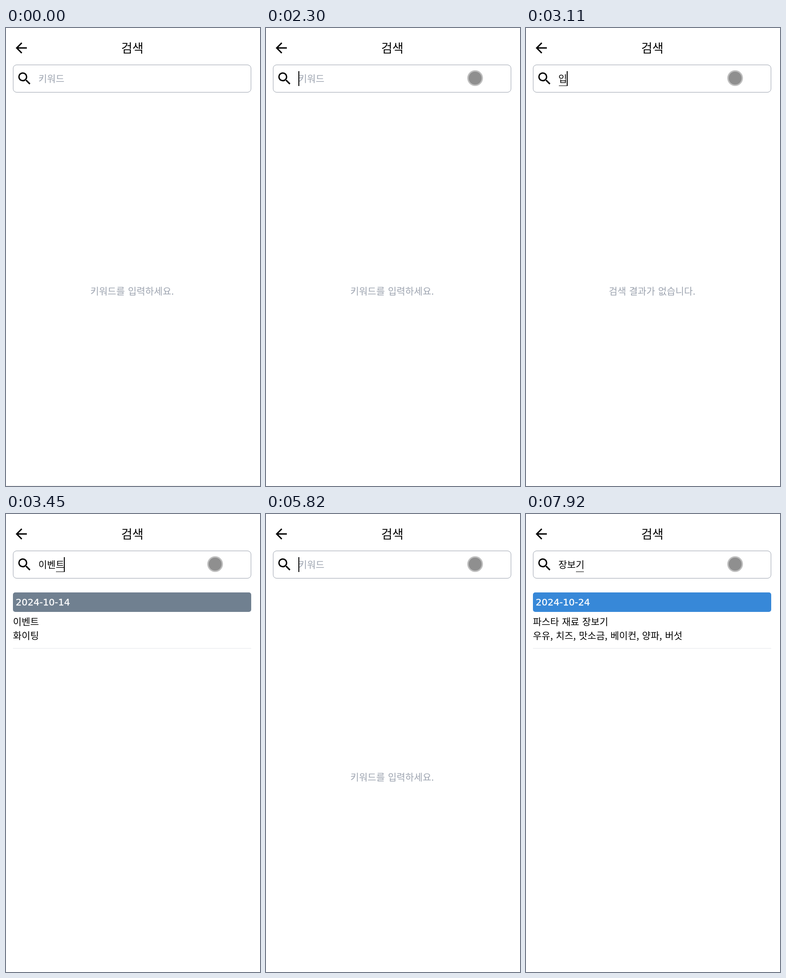
Animation of 549x987 px, one loop 8 s. Source, as an HTML page:

```html
<!DOCTYPE html>
<html lang="ko">
<head>
<meta charset="utf-8">
<title>검색</title>
<style>
  html, body { margin: 0; width: 100%; height: 100%; overflow: hidden; background: #fff; }
  svg { display: block; width: 100vw; height: 100vh; }
  text { font: 20.35px "Noto Sans CJK KR", "Noto Sans CJK", "Noto Sans KR", sans-serif; word-spacing: .8px; white-space: pre; }
  .title { font-size: 26.2px; }
  .mid { text-anchor: middle; }
  .hint { fill: #9ca3af; }
  .date { font: 20.2px "DejaVu Sans", sans-serif; fill: #fff; stroke: #fff; stroke-width: .35px; }
</style>
</head>
<body>
<svg viewBox="0 0 549 987" preserveAspectRatio="none">
  <path transform="translate(15 25) scale(1.5)" d="M20 11H7.83l5.59-5.59L12 4l-8 8 8 8 1.41-1.41L7.83 13H20v-2z"/>
  <text class="title mid" x="273" y="53">검색</text>
  <rect x="15.5" y="79.5" width="514" height="59" rx="7.5" fill="none" stroke="#9ca3af"/>
  <path transform="translate(22 91) scale(1.5)" d="M15.5 14h-.79l-.28-.27A6.47 6.47 0 0 0 16 9.5 6.5 6.5 0 1 0 9.5 16c1.61 0 3.09-.59 4.23-1.57l.27.28v.79l5 4.99L20.49 19l-4.99-5zm-6 0C7.01 14 5 11.99 5 9.5S7.01 5 9.5 5 14 7.01 14 9.5 11.99 14 9.5 14z"/>
  <text id="query" x="70" y="116.5"></text>
  <rect id="underline" y="124" width="17" height="1"/>
  <rect id="caret" y="93" width="2" height="32"/>
  <text id="message" class="mid hint" x="272.5" y="574.5"></text>
  <g id="list"></g>
  <rect id="footer" y="986" width="549" height="1" fill="#ebebeb"/>
  <g id="pointer">
    <circle r="17" fill-opacity=".25"/>
    <circle r="14" fill-opacity=".25"/>
  </g>
</svg>
<script>
const LOOP = 8000, FOCUS = 1300, CHAR = 18.72;

const events = [
  { date: '2024-10-14', color: '#708090', title: '이벤트', note: '화이팅' },
  { date: '2024-10-24', color: '#3788d8', title: '파스타 재료 장보기', note: '우유, 치즈, 맛소금, 베이컨, 양파, 버섯' }
];

// [time, query, caret visible, last character still being composed]
const steps = [
  [0, '', 0, 0], [FOCUS, '', 1, 0], [1810, '', 0, 0], [2300, '', 1, 0],
  [2790, 'ㅇ', 1, 1], [2890, '이', 1, 1], [3030, '입', 1, 1], [3120, '이베', 1, 1],
  [3220, '이벤', 1, 1], [3310, '이벤ㅌ', 1, 1], [3450, '이벤트', 1, 1],
  [3940, '이벤트', 0, 1], [4430, '이벤트', 1, 1], [4920, '이벤트', 0, 1],
  [5300, '이벤ㅌ', 1, 1], [5460, '이벤', 1, 0], [5620, '이', 1, 0], [5820, '', 1, 0],
  [5970, '', 0, 0], [6450, '', 1, 0],
  [6820, 'ㅈ', 1, 1], [6960, '자', 1, 1], [7030, '장', 1, 1], [7140, '장ㅂ', 1, 1],
  [7230, '장보', 1, 1], [7310, '장복', 1, 1], [7400, '장보기', 1, 1], [7920, '장보기', 0, 1]
];

const $ = id => document.getElementById(id);
const show = (el, on) => el.setAttribute('visibility', on ? 'visible' : 'hidden');

const card = (e, i) => `<g transform="translate(15 ${169 + 133 * i})">
  <rect width="515" height="42" rx="5" fill="${e.color}"/>
  <text class="date" x="6" y="28.3">${e.date}</text>
  <text y="70.5">${e.title}</text>
  <text y="100.5">${e.note}</text>
  <rect y="120" width="515" height="1" fill="#e5e7eb"/>
</g>`;

function drawStep([, text, caretOn, composing]) {
  const n = text.length;
  $('query').textContent = text || '키워드';
  $('query').setAttribute('class', text ? '' : 'hint');
  $('caret').setAttribute('x', 70 + Math.floor(18.5 * n));
  show($('caret'), caretOn);
  $('underline').setAttribute('x', Math.round(70.8 + CHAR * (n - 1)));
  show($('underline'), composing);

  const found = text ? events.filter(e => (e.title + '\n' + e.note).includes(text)) : [];
  $('list').innerHTML = found.map(card).join('');
  $('message').textContent = found.length ? '' : text ? '검색 결과가 없습니다.' : '키워드를 입력하세요.';
}

function drawPointer(t) {
  const p = Math.min(1, Math.max(0, (t - 720) / 370));
  const k = 1 - (1 - p) ** 2;
  const scale = t >= FOCUS && t < 1380 ? 1.04 : 1;
  $('pointer').setAttribute('transform', `translate(${519 - 67 * k} ${70 + 38 * k}) scale(${scale})`);
  show($('pointer'), t >= 720);
}

const start = performance.now();
let current;
function frame(now) {
  const t = Math.max(0, now - start) % LOOP;
  const step = steps.findLast(s => s[0] <= t);
  if (step !== current) drawStep(current = step);
  drawPointer(t);
  show($('footer'), t < FOCUS);
  requestAnimationFrame(frame);
}
frame(start);
</script>
</body>
</html>
```
